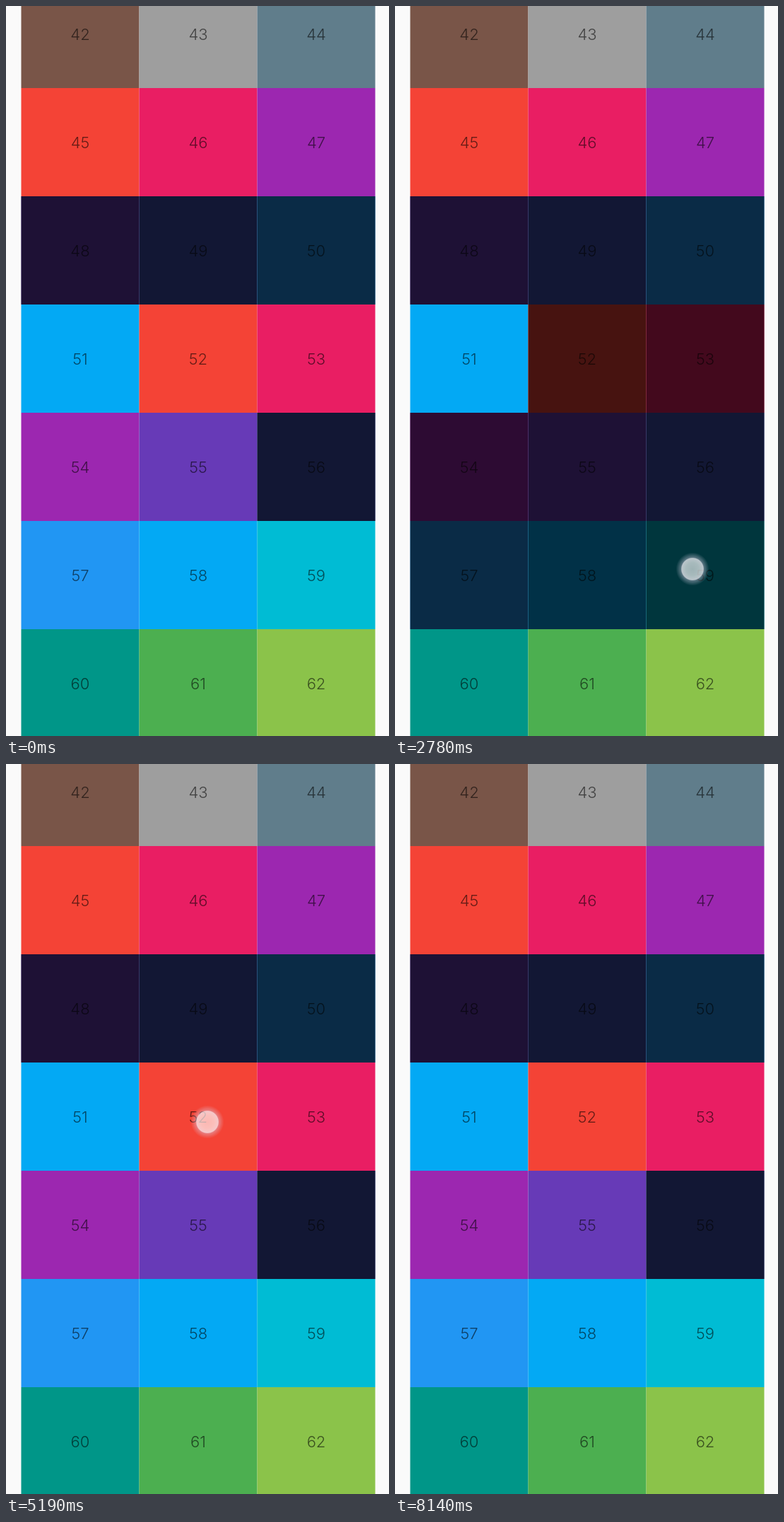
These frames come from a looping animation (542x1032 px, 8.24 s). An HTML page:

```html
<!DOCTYPE html>
<html lang="en">
<head>
<meta charset="utf-8">
<title>Drag selection grid</title>
<style>
  html, body { margin: 0; width: 100%; height: 100%; overflow: hidden; background: #fafafa; }
  svg { display: block; width: 100vw; height: 100vh; }
  text { font: 300 22px Inter, "Liberation Sans", sans-serif; text-anchor: middle; fill: #000; fill-opacity: .58; }
</style>
</head>
<body>
<svg viewBox="0 0 542 1032">
  <defs>
    <radialGradient id="touch">
      <stop offset="0" stop-color="#fff" stop-opacity=".62"/>
      <stop offset=".4" stop-color="#fff" stop-opacity=".66"/>
      <stop offset=".65" stop-color="#f6f2f8" stop-opacity=".76"/>
      <stop offset=".7" stop-color="#d8d0e4" stop-opacity=".4"/>
      <stop offset="1" stop-color="#d8d0e4" stop-opacity="0"/>
    </radialGradient>
  </defs>
  <g id="grid"></g>
  <circle id="pointer" r="23.5" fill="url(#touch)"/>
</svg>
<script>
const LOOP = 8240, FIRST = 42, ANCHOR = 52;
const LEFT = 21.5, TOP = -37, CELL_W = 167, CELL_H = 153;
const INPUT_LAG = 50;
const COLORS = ['#795548', '#9e9e9e', '#607d8b',
  '#f44336', '#e91e63', '#9c27b0', '#673ab7', '#3f51b5', '#2196f3', '#03a9f4',
  '#f44336', '#e91e63', '#9c27b0', '#673ab7', '#3f51b5', '#2196f3', '#03a9f4',
  '#00bcd4', '#009688', '#4caf50', '#8bc34a'];
const PRESELECTED = new Set([48, 49, 50, 56]);

const HOME = [285, 506], LOW = [421, 796], HIGH = [119, 200];
// Each gesture presses the anchor cell, drags out to a point and returns.
const GESTURES = [
  { press: 1150, hold: 1600, out: [1560, 2760], back: [2930, 3850], release: 3950, to: LOW, select: true },
  { press: 4560, hold: 5030, out: [5190, 6110], back: [6160, 6950], release: 7100, to: HIGH, select: false }
];

const grid = document.getElementById('grid');
const pointer = document.getElementById('pointer');

function add(tag, attributes) {
  const node = document.createElementNS('http://www.w3.org/2000/svg', tag);
  for (const name in attributes) node.setAttribute(name, attributes[name]);
  return grid.appendChild(node);
}

const shades = COLORS.map((fill, i) => {
  const x = LEFT + i % 3 * CELL_W, y = TOP + Math.floor(i / 3) * CELL_H;
  const box = { x, y, width: CELL_W, height: CELL_H };
  add('rect', { ...box, fill });
  add('text', { x: x + CELL_W / 2, y: y + CELL_H / 2 + 8 }).textContent = FIRST + i;
  return add('rect', { ...box, fill: '#000', 'fill-opacity': .71 });
});

const clamp = v => Math.max(0, Math.min(1, v));
const ramp = (t, start, end) => clamp((t - start) / (end - start));
const ease = u => u * u * (3 - 2 * u);

function position(gesture, t) {
  const reach = ease(ramp(t, ...gesture.out)) - ease(ramp(t, ...gesture.back));
  return HOME.map((v, axis) => v + (gesture.to[axis] - v) * reach);
}

function cellAt([x, y]) {
  return FIRST + Math.floor((y - TOP) / CELL_H) * 3 + Math.floor((x - LEFT) / CELL_W);
}

function selectionAt(t) {
  const selected = new Set(PRESELECTED);
  for (const gesture of GESTURES) {
    if (t < gesture.hold) continue;
    const cell = cellAt(position(gesture, t - INPUT_LAG));
    const last = Math.max(cell, ANCHOR);
    for (let n = Math.min(cell, ANCHOR); n <= last; n++) {
      if (gesture.select) selected.add(n); else selected.delete(n);
    }
  }
  return selected;
}

function draw(now) {
  const t = now % LOOP;
  const selected = selectionAt(t);
  shades.forEach((shade, i) => {
    shade.style.display = selected.has(FIRST + i) ? '' : 'none';
  });
  const gesture = GESTURES[t < GESTURES[1].press ? 0 : 1];
  const [x, y] = position(gesture, t);
  pointer.setAttribute('cx', x);
  pointer.setAttribute('cy', y);
  pointer.style.opacity = ramp(t, gesture.press, gesture.press + 60) *
    (1 - ramp(t, gesture.release, gesture.release + 120));
  requestAnimationFrame(draw);
}
draw(performance.now());
</script>
</body>
</html>
```
